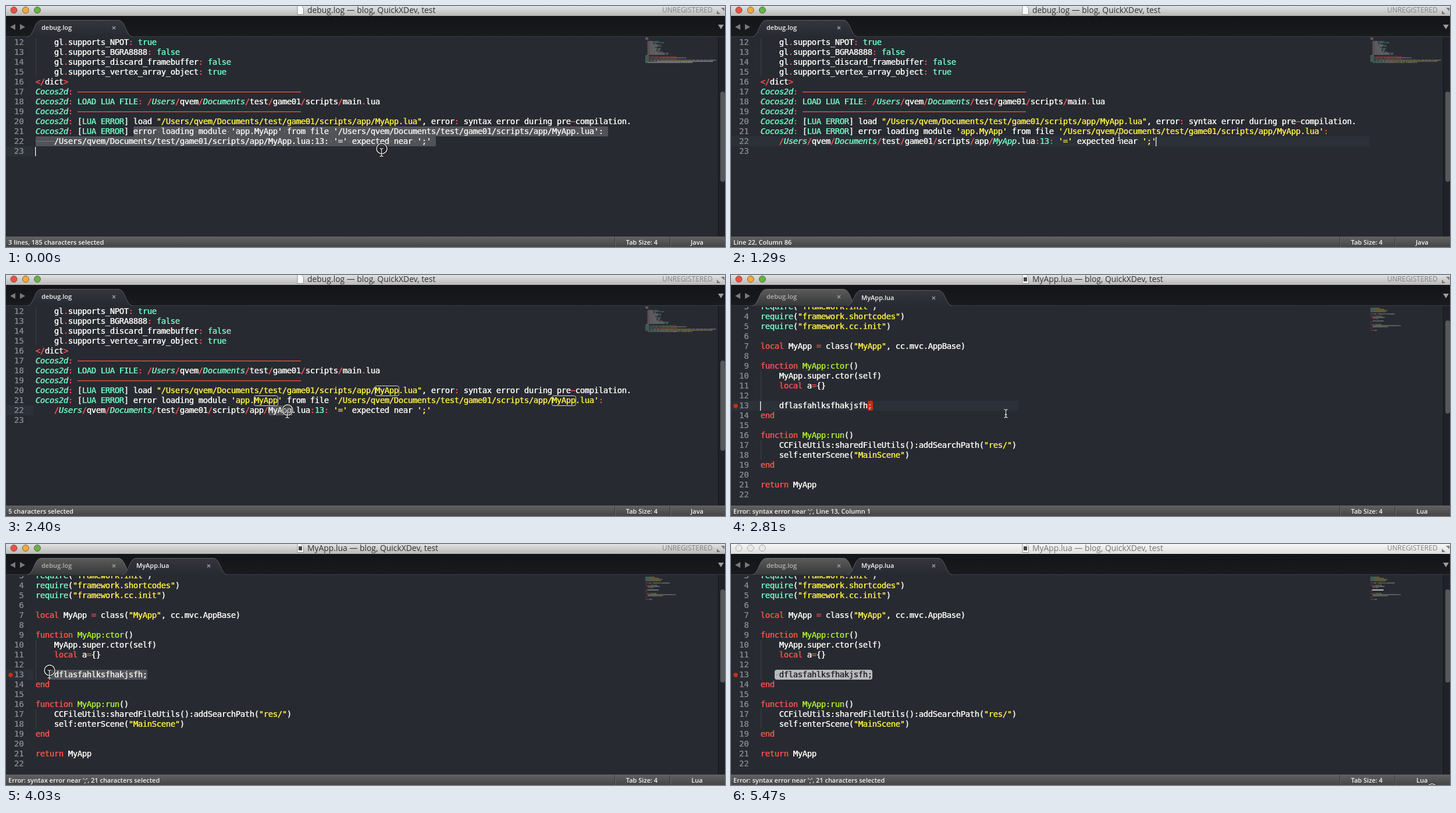
Write an HTML page with a canvas that moves like this. It is 1236x414 px and loops after 5530 ms.

```html
<!DOCTYPE html>
<html lang="en">
<head>
<meta charset="utf-8">
<title>Editor: jump from log to error</title>
<style>
html, body { margin: 0; width: 100%; height: 100%; overflow: hidden; background: #282a32; }
canvas { display: block; }
</style>
</head>
<body>
<canvas id="stage" width="1236" height="414"></canvas>
<script>
const ctx = document.getElementById('stage').getContext('2d');
const LOOP = 5530, W = 1236, H = 414, CELL = 8, ROW = 17, LEFT = 51;
const MONO = '14px "DejaVu Sans Mono", monospace';
const UI = '"Open Sans", "Noto Sans", sans-serif';
const PAGE = '#282a32', SELECTED = '#515358', SELECTED_IDLE = '#b8b9bb';
const COLORS = { w: '#f4f4ee', r: '#f5524c', c: '#72f3bf', i: '#72f3bf', y: '#f4e945', g: '#a8e82c' };

// "~x" switches the colour; "i" is also italic.
const home = '~r/~iUsers~r/~wqvem~r/~iDocuments~r/~wtest~r/~wgame01~r/~wscripts~r/';
const appPath = '/Users/qvem/Documents/test/game01/scripts/app/MyApp.lua';
const rule = '~iCocos2d~r: ' + '-'.repeat(48);
const luaError = '~iCocos2d~r: ~w[~cLUA ERROR~w] ';
const glLine = (name, value) => `    gl~r.~w${name}~r:~c ${value}`;

function parse(source) {
  const cells = [];
  let kind = 'w';
  for (let i = 0; i < source.length; i++) {
    if (source[i] === '~') kind = source[++i];
    else cells.push({ ch: source[i], kind });
  }
  return cells;
}

const logDoc = {
  top: -133, guides: [[12, 15]], thumb: [147, 302], lang: 'Java', title: 'debug.log',
  lines: [
    '~wstart', '~r<~wdict~r>', '',
    glLine('vendor', 'generic gl'), glLine('renderer', 'generic gl engine'), glLine('version', '2.1'),
    glLine('max_texture_units', '16'), glLine('max_texture_size', '8192'),
    glLine('max_samples', '8'), glLine('supports_PVRTC', 'false'), glLine('supports_ETC1', 'false'),
    glLine('supports_NPOT', 'true'), glLine('supports_BGRA8888', 'false'),
    glLine('supports_discard_framebuffer', 'false'), glLine('supports_vertex_array_object', 'true'),
    '~r</~wdict~r>', rule,
    '~iCocos2d~r:~c LOAD LUA FILE~r: ' + home + '~wmain~r.~wlua', rule,
    luaError + `load ~y"${appPath}"~w, error~r:~w syntax error during pre~r-~wcompilation.`,
    luaError + `error loading module ~y'app.MyApp'~w from file ~y'${appPath}'~r:`,
    '    ' + home + "~wapp~r/~iMyApp~w.lua~r:~c13~r: ~y'='~w expected near ~y';'", ''
  ].map(parse)
};

const luaDoc = {
  top: 12, guides: [[10, 13], [17, 18]], thumb: [78, 238], lang: 'Lua', title: 'MyApp.lua',
  lines: [
    '', '~crequire~w(~y"config"~w)', '~crequire~w(~y"framework.init"~w)',
    '~crequire~w(~y"framework.shortcodes"~w)', '~crequire~w(~y"framework.cc.init"~w)', '',
    '~rlocal~w MyApp ~r=~w class(~y"MyApp"~w, cc.mvc.AppBase)', '',
    '~rfunction ~gMyApp:ctor~w()', '    MyApp.super.ctor(self)', '    ~rlocal~w a~r=~w{}', '',
    '    dflasfahlksfhakjsfh;', '~rend', '',
    '~rfunction ~gMyApp:run~w()',
    '    CCFileUtils:sharedFileUtils():addSearchPath(~y"res/"~w)',
    '    self:enterScene(~y"MainScene"~w)', '~rend', '', '~rreturn~w MyApp', ''
  ].map(parse)
};

// Pointer path: time, x, y
const PATH = [
  [60, 646, 245], [420, 747, 237], [900, 747, 237], [1170, 742, 231], [1230, 735, 228],
  [1290, 668, 218], [1500, 560, 213], [1750, 459, 226], [1810, 459, 226], [2050, 484, 232],
  [2700, 484, 232], [2750, 473.5, 231.5], [2810, 473.5, 231.5], [3280, 244, 218], [3340, 244, 218],
  [3800, 78, 217], [3910, 78, 217], [4030, 75, 217], [4200, 75, 217], [4730, 945, 385],
  [4780, 945, 385], [5010, 1073, 402], [5240, 1073, 402], [5410, 1205, 421]
];
const PRESSES = [[0, 480], [770, 950], [2100, 2280], [2400, 2510], [3340, 4200], [5410, LOOP]];

function pointerAt(t) {
  const next = PATH.findIndex(p => p[0] > t);
  if (next < 0) return PATH[PATH.length - 1].slice(1);
  if (next === 0) return PATH[0].slice(1);
  const [t0, x0, y0] = PATH[next - 1], [t1, x1, y1] = PATH[next];
  const k = (t - t0) / (t1 - t0);
  return [x0 + (x1 - x0) * k, y0 + (y1 - y0) * k];
}

const colAt = x => Math.round((x - LEFT) / CELL);

function stateAt(t) {
  const [x, y] = pointerAt(t);
  const s = {
    x, y, doc: t < 2510 ? logDoc : luaDoc, sel: {}, boxes: [], active: t < 5410,
    arrow: (t >= 650 && t < 950) || y > 396,
    pressed: PRESSES.some(([from, to]) => t >= from && t < to)
  };
  if (t < 950) {
    const below = y >= 241;
    const col = below ? 86 : Math.min(85, colAt(x));
    s.sel = { 21: [21, 123], 22: [0, col] };
    s.caret = below ? [23, 0] : [22, col];
    s.status = `${below ? 3 : 2} lines, ${99 + col} characters selected`;
  } else if (t < 2400) {
    s.caret = [22, t < 2100 ? 85 : 54];
    s.status = `Line 22, Column ${s.caret[1] + 1}`;
    s.glow = 1098;
  } else if (t < 2510) {
    s.sel = { 22: [50, 55] };
    s.caret = [22, 55];
    s.boxes = [[20, 73], [21, 47], [21, 111]];
    s.status = '5 characters selected';
  } else {
    s.lint = t >= 2750;
    const col = t < 3340 ? 0 : Math.max(3, Math.min(24, colAt(x)));
    const start = t < 3800 ? col : 3;
    s.caret = [13, start];
    let place = `Line 13, Column ${start + 1}`;
    if (t >= 3340 && start < 24) {
      s.sel = { 13: [start, 24] };
      place = `${24 - start} characters selected`;
    } else {
      s.glow = s.lint ? 494 : 47;
      s.mark = s.lint;
    }
    s.status = (s.lint ? "Error: syntax error near ';', " : '') + place;
    s.tabDrop = Math.max(0, Math.min(8, (2870 - t) / 30));
  }
  return s;
}

function rect(x, y, w, h, fill) {
  ctx.fillStyle = fill;
  ctx.fillRect(x, y, w, h);
}

function shade(y, h, from, to) {
  const g = ctx.createLinearGradient(0, y, 0, y + h);
  g.addColorStop(0, from);
  g.addColorStop(1, to);
  return g;
}

function label(text, x, y, size, color, weight = 400, align = 'left') {
  ctx.font = `${weight} ${size}px ${UI}`;
  ctx.textAlign = align;
  ctx.fillStyle = color;
  ctx.fillText(text, x, y);
}

// Two overlapping passes give the code its heavier stems.
function codeText(text, x, y, color, italic = false) {
  ctx.font = (italic ? 'italic ' : '') + MONO;
  ctx.fillStyle = color;
  ctx.fillText(text, x - 0.4, y);
  ctx.fillText(text, x, y);
}

function roundBox(x, y, w, h, r, fill, stroke) {
  ctx.beginPath();
  ctx.roundRect(x, y, w, h, r);
  if (fill) { ctx.fillStyle = fill; ctx.fill(); }
  if (stroke) { ctx.strokeStyle = stroke; ctx.lineWidth = 1; ctx.stroke(); }
}

function polygon(points, fill) {
  ctx.beginPath();
  points.forEach(([x, y]) => ctx.lineTo(x, y));
  ctx.closePath();
  ctx.fillStyle = fill;
  ctx.fill();
}

function disc(x, y, r, fill, stroke) {
  ctx.beginPath();
  ctx.arc(x, y, r, 0, 7);
  ctx.fillStyle = fill;
  ctx.fill();
  if (stroke) { ctx.strokeStyle = stroke; ctx.lineWidth = 1; ctx.stroke(); }
}

function drawCode(s) {
  const { doc } = s;
  const rowTop = n => doc.top + (n - 1) * ROW;
  const colX = c => LEFT + c * CELL;
  ctx.save();
  ctx.beginPath();
  ctx.rect(0, 55, W, 341);
  ctx.clip();
  if (s.active) rect(0, rowTop(s.caret[0]), s.glow || 47, ROW, '#2c3038');

  for (const [from, to] of doc.guides)
    for (let y = rowTop(from); y < rowTop(to + 1); y += 2) rect(LEFT, y, 1, 1, '#55575b');

  doc.lines.forEach((cells, i) => {
    const n = i + 1, y = rowTop(n), sel = s.sel[n];
    if (y < 40) return;
    if (sel) {
      const x = colX(sel[0]), w = (sel[1] - sel[0]) * CELL;
      roundBox(x, y, w, ROW, s.active ? 2 : 4, s.active ? SELECTED : SELECTED_IDLE);
    }
    ctx.textAlign = 'right';
    codeText(n, 31, y + 13, '#85878b');
    ctx.textAlign = 'left';
    cells.forEach(({ ch, kind }, col) => {
      const x = colX(col), picked = sel && col >= sel[0] && col < sel[1];
      const color = picked ? (s.active ? '#ebebe8' : '#26282c') : COLORS[kind];
      if (ch === '-') rect(x, y + 8, CELL, 1.3, color);
      else if (ch !== ' ') codeText(ch, x, y + 13, color, kind === 'i' && !picked);
      else if (picked && doc === logDoc && n === 22 && col < 4) rect(x, y + 8, CELL, 1, '#77797d');
      else if (picked) rect(x + 3, y + 8, 1.5, 1.5, '#808286');
    });
  });

  for (const [n, col] of s.boxes) roundBox(colX(col) - 0.5, rowTop(n) + 0.5, 41, ROW, 3, null, '#d8d8d4');
  if (s.lint) disc(8, rowTop(13) + 9, 3.7, '#c9300f');
  if (s.mark) {
    roundBox(colX(23), rowTop(13), 9, ROW, 3, '#d4290a');
    codeText(';', colX(23), rowTop(13) + 13, '#7fd8c0');
  }
  if (s.active) rect(colX(s.caret[1]) - 1, rowTop(s.caret[0]) + 1, 1.3, ROW - 1, '#f8f8f4');
  ctx.restore();
}

function drawMinimap(s) {
  const step = 0.95;
  s.doc.lines.forEach((cells, i) => {
    const y = 54 + i * 2, sel = s.sel[i + 1];
    if (sel) rect(1099 + sel[0] * step, y, (sel[1] - sel[0]) * step, 2, s.active ? SELECTED : SELECTED_IDLE);
    ctx.globalAlpha = 0.45;
    cells.forEach(({ ch, kind }, col) => {
      const picked = sel && col >= sel[0] && col < sel[1];
      if (ch !== ' ') rect(1099 + col * step, y + 0.4, step, 1.2, picked ? '#c8c8c5' : COLORS[kind]);
    });
    ctx.globalAlpha = 1;
  });
}

function drawTab(x, name, front, drop = 0) {
  const top = 24.5 + drop, w = 172;
  ctx.save();
  ctx.beginPath();
  ctx.rect(0, 17, W, 36);
  ctx.clip();
  ctx.beginPath();
  ctx.moveTo(x - 4, 53);
  ctx.bezierCurveTo(x + 8, 50, x + 7, top, x + 20, top);
  ctx.lineTo(x + w - 20, top);
  ctx.bezierCurveTo(x + w - 7, top, x + w - 8, 50, x + w + 4, 53);
  ctx.fillStyle = front ? shade(top, 28, '#34363b', PAGE) : shade(top, 28, '#5b5b59', '#373839');
  ctx.fill();
  ctx.strokeStyle = front ? '#5a5c60' : '#707070';
  ctx.lineWidth = 1;
  ctx.stroke();
  label(name, x + 20, 41 + drop, 11, front ? '#f4f4f4' : '#b4b4b2', 600);
  ctx.strokeStyle = '#a0a1a3';
  ctx.lineWidth = 1.3;
  ctx.beginPath();
  for (const d of [-1, 1]) {
    ctx.moveTo(x + 142, 37.5 + drop - 2.5 * d);
    ctx.lineTo(x + 147, 37.5 + drop + 2.5 * d);
  }
  ctx.stroke();
  ctx.restore();
}

function drawChrome(s) {
  const isLog = s.doc === logDoc;
  rect(0, 17, W, 36, shade(17, 36, '#121418', '#191b1f'));
  rect(0, 52, W, 1, '#3b3d41');
  for (const [tip, back] of [[7, 16], [33, 24]]) polygon([[tip, 36], [back, 31], [back, 41]], '#77797c');
  polygon([[1224, 32], [1234, 32], [1229, 40]], '#9a9b9d');
  drawTab(41, 'debug.log', isLog);
  if (!isLog) drawTab(204, 'MyApp.lua', true, s.tabDrop);

  rect(0, 0, W, 17, s.active ? shade(0, 17, '#e2e2e2', '#b8b8b8') : shade(0, 17, '#f6f6f6', '#dedede'));
  ['#ea5145', '#f2a93a', '#62b544'].forEach((color, i) =>
    disc(13.5 + i * 20.2, 7, 5.5, s.active ? color : '#e9e9e9', s.active ? 'rgba(70,40,20,.6)' : '#aaa'));
  polygon([[500.5, 0], [508, 0], [512, 4], [512, 15], [500.5, 15]], '#8d8d8d');
  polygon([[501.5, 0], [507.5, 0], [511, 4], [511, 14], [501.5, 14]], '#fafafa');
  if (!isLog) rect(503, 4, 6, 7, '#444');
  label(`${s.doc.title} — blog, QuickXDev, test`, 518, 12, 13.9, s.active ? '#303030' : '#777');
  label('UNREGISTERED', 1128, 11, 12, '#828282');
  polygon([[1229, 3], [1235, 3], [1235, 9]], '#777');
  polygon([[1222, 8], [1222, 14], [1228, 14]], '#777');

  rect(1224, 53, 12, 343, '#202227');
  rect(1224, 53, 1, 343, '#15171a');
  const [from, to] = s.doc.thumb;
  roundBox(1228, from, 8, to - from, 4, '#56585c');

  rect(0, 396, W, 18, shade(396, 18, '#626262', '#454545'));
  for (const x of [1046, 1141]) {
    rect(x, 397, 1, 17, '#333');
    rect(x + 1, 397, 1, 17, '#6c6c6c');
  }
  label(s.status, 4, 410, 11, '#f4f4f4', 600);
  label('Tab Size: 4', 1093, 410, 11, '#f4f4f4', 600, 'center');
  label(s.doc.lang, 1188, 410, 11, '#f4f4f4', 600, 'center');
}

function drawPointer({ x, y, arrow, pressed }) {
  if (pressed) {
    disc(x, y, 9, 'rgba(0,0,0,.15)');
    ctx.strokeStyle = '#111';
    ctx.lineWidth = 3;
    ctx.stroke();
    ctx.strokeStyle = '#f5f5f5';
    ctx.lineWidth = 1.4;
    ctx.stroke();
  }
  ctx.save();
  ctx.translate(x - 0.5, y);
  ctx.beginPath();
  if (arrow) {
    [[0, 0], [0, 14], [3.2, 11], [5.5, 16], [8, 15], [5.8, 10], [10, 10]].forEach(p => ctx.lineTo(...p));
    ctx.closePath();
    ctx.fillStyle = '#111';
    ctx.fill();
  } else {
    for (const side of [-3, 3]) {
      ctx.moveTo(side, -0.5);
      ctx.quadraticCurveTo(0, -0.5, 0, 2);
      ctx.lineTo(0, 11);
      ctx.quadraticCurveTo(0, 13.5, side, 13.5);
    }
    ctx.moveTo(-2, 8.5);
    ctx.lineTo(2, 8.5);
    ctx.strokeStyle = '#111';
    ctx.lineWidth = 2.6;
    ctx.stroke();
  }
  ctx.strokeStyle = '#f5f5f5';
  ctx.lineWidth = 1.2;
  ctx.stroke();
  ctx.restore();
}

function draw(t) {
  const s = stateAt(t);
  rect(0, 0, W, H, PAGE);
  drawCode(s);
  drawMinimap(s);
  drawChrome(s);
  drawPointer(s);
}

const start = performance.now();
function tick() {
  draw((performance.now() - start) % LOOP);
  requestAnimationFrame(tick);
}
tick();
</script>
</body>
</html>
```
